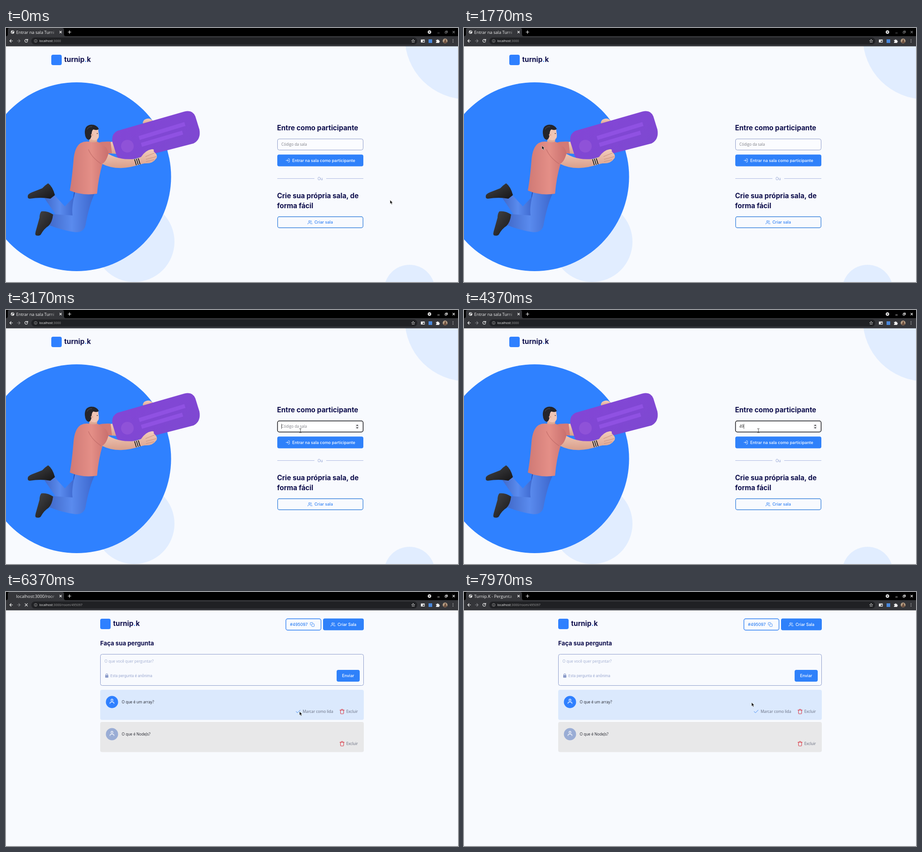
Write an HTML page that moves like this. It is 998 px wide and 561 px high and loops after 8 s.

```html
<!DOCTYPE html>
<html lang="pt-BR">
<head>
<meta charset="utf-8">
<title>Sala de perguntas</title>
<style>
  html, body { margin: 0; width: 100%; height: 100%; overflow: hidden; background: #f8fafe; }
  svg.stage { display: block; width: 100vw; height: 100vh; }
  text { white-space: pre; font: 8.32px "Open Sans", sans-serif; }
  .ui { font: 500 9px Inter, sans-serif; }
  .note { font: 400 7.9px Inter, sans-serif; }
  .title { font: 700 15.3px Inter, sans-serif; fill: #0e0e4c; }
  .sub { font-size: 13.2px; }
  .tab { font-size: 9.3px; fill: #f1f1f1; }
  .url { font-size: 7.1px; fill: #999; }
  .icon { fill: none; stroke: currentColor; stroke-width: 2; stroke-linecap: round; stroke-linejoin: round; }
  .white { color: #fff; fill: #fff; }
  .blue { color: #2f80f4; fill: #2f80f4; }
  .red { color: #d9323f; }
  .line { fill: none; stroke-width: 1.2; stroke-linecap: round; stroke-linejoin: round; }
</style>
</head>
<body>
<svg class="stage" viewBox="0 0 998 561" preserveAspectRatio="none">
  <defs>
    <symbol id="enter" viewBox="0 0 24 24"><path class="icon" d="M15 3h4a2 2 0 0 1 2 2v14a2 2 0 0 1-2 2h-4M10 17l5-5-5-5M15 12H3"/></symbol>
    <symbol id="users" viewBox="0 0 24 24"><path class="icon" d="M17 21v-2a4 4 0 0 0-4-4H5a4 4 0 0 0-4 4v2M5 7a4 4 0 1 0 8 0a4 4 0 1 0-8 0M23 21v-2a4 4 0 0 0-3-3.9M16 3.1a4 4 0 0 1 0 7.8"/></symbol>
    <symbol id="user" viewBox="0 0 24 24"><path class="icon" d="M20 21v-2a4 4 0 0 0-4-4H8a4 4 0 0 0-4 4v2M8 7a4 4 0 1 0 8 0a4 4 0 1 0-8 0"/></symbol>
    <symbol id="copy" viewBox="0 0 24 24"><path class="icon" d="M9 11q0-2 2-2h9q2 0 2 2v9q0 2-2 2h-9q-2 0-2-2zM5 15H4q-2 0-2-2V4q0-2 2-2h9q2 0 2 2v1"/></symbol>
    <symbol id="check" viewBox="0 0 24 24"><path class="icon" d="M22 5L9 18l-7-6"/></symbol>
    <symbol id="trash" viewBox="0 0 24 24"><path class="icon" d="M2 6h20M19 6v14q0 2-2 2H7q-2 0-2-2V6M8 6V4q0-2 2-2h4q2 0 2 2v2"/></symbol>
    <g id="brand">
      <rect y="59" width="23" height="23" rx="4" fill="#2f80ff"/>
      <text class="title" x="28.5" y="75">turnip<tspan fill="#2f80ff">.</tspan>k</text>
    </g>
    <g id="delete">
      <use href="#trash" class="red" x="736" y="258" width="12" height="12"/>
      <text x="751.5" y="267" fill="#62687c">Excluir</text>
    </g>
    <linearGradient id="shirt"><stop stop-color="#cf7975"/><stop offset=".55" stop-color="#e48f87"/><stop offset="1" stop-color="#c96f6d"/></linearGradient>
    <linearGradient id="skin" x2="0" y2="1"><stop stop-color="#f3cdbb"/><stop offset="1" stop-color="#d99f8b"/></linearGradient>
    <linearGradient id="jeans"><stop stop-color="#4169c9"/><stop offset=".5" stop-color="#5a8bee"/><stop offset="1" stop-color="#3c66cc"/></linearGradient>
    <linearGradient id="shoe" x2="1" y2="1"><stop stop-color="#464648"/><stop offset="1" stop-color="#151517"/></linearGradient>
    <linearGradient id="card" x2="1" y2="1"><stop stop-color="#8545d8"/><stop offset="1" stop-color="#7c49cf"/></linearGradient>
    <linearGradient id="fade"><stop stop-color="#35363a" stop-opacity="0"/><stop offset="1" stop-color="#35363a"/></linearGradient>
  </defs>

  <rect width="998" height="561" fill="#f8fafe"/>

  <g id="home">
    <g fill="#e1edff">
      <circle cx="1018" cy="20" r="137.5"/>
      <circle cx="283" cy="472" r="89"/>
      <circle cx="891" cy="579" r="56"/>
    </g>
    <circle cx="156" cy="328.5" r="208.5" fill="#2f81ff"/>
    <use href="#brand" x="100"/>

    <g id="hero">
      <path fill="url(#skin)" d="M302 209Q303 203 309 201Q318 198 324 205L320 212L304 214Z"/>
      <path fill="url(#skin)" d="M225 253L240 250L244 278L230 277Z"/>
      <path fill="#d37a76" d="M200 254Q215 250 231 251L234 277L215 277Z"/>
      <path fill="url(#card)" d="M246 227L394 184.500Q412 180 418 195L427 224Q431 246 414 255L271 292Q250 297 244 281L235 252Q232 234 246 227Z"/>
      <circle cx="268" cy="261" r="14" fill="#8f52d8"/>
      <path stroke="#8f51e2" stroke-width="9" d="M294 243L395 212M299 258L390 231"/>
      <path fill="#2f55b8" d="M150 362L180 366L158 421Q143 430 130 415Q146 402 150 362Z"/>
      <path fill="url(#jeans)" d="M85 376L105 367L130 394L150 373L153 394L150 416Q133 430 115 420Z"/>
      <path fill="url(#jeans)" d="M153 361L196 365Q184 389 175 438Q170 452 153 451Q124 447 94 435L102 411L147 414Q144 397 153 361Z"/>
      <path fill="url(#shoe)" d="M48 373Q47 367 57 363L80 354Q85 348 93 343Q103 350 108 369L98 377Q77 373 53 377Q48 377 48 373Z"/>
      <path fill="url(#shoe)" d="M78 405Q91 403 104 412Q102 429 94 437Q84 443 77 456Q74 460 66 458Q63 456 67 444L74 419Q74 410 78 405Z"/>
      <path fill="url(#skin)" d="M187 235L203 240L200 254L183 253Z"/>
      <path fill="url(#shirt)" d="M182 251Q193 254 202 251L221 264Q229 275 226 290L213 300Q204 330 201 366Q169 371 141 359Q146 331 149 293Q151 263 165 254Q173 250 182 251Z"/>
      <path fill="none" stroke="#b96563" stroke-width="1.500" opacity=".6" d="M182 268Q189 286 210 300"/>
      <path fill="url(#skin)" d="M226 278Q253 293 285 289L298 285Q308 270 321 268Q328 267 326 272L332 279Q335 285 331 289Q324 300 306 299L297 301Q247 318 212 300Q221 296 226 278Z"/>
      <path fill="none" stroke="#c98f7c" d="M308 284L328 276M309 290L332 284M309 295L327 291"/>
      <path fill="none" stroke="#222" stroke-width="2" d="M284 290L288 303M288 289L292 302M292 288L296 301"/>
      <path fill="none" stroke="#eee" d="M286 290L290 303M290 289L294 302"/>
      <path fill="#f0c5b4" d="M188 222L203 220L205 236Q206 246 196 248Q187 248 184 241Z"/>
      <path fill="#25252b" d="M174 232Q173 215 188 213.500Q200 213 205 223Q201 227 193 224Q189 226 189 236Q188 246 182 247Q175 245 174 232Z"/>
      <path fill="none" stroke="#55555d" d="M179 224Q183 217 190 218"/>
      <circle cx="201.500" cy="233" r="1" fill="#34272a"/>
      <circle cx="190" cy="236" r="2.500" fill="#e3ad9a"/>
    </g>

    <text class="title" x="598.5" y="225.5">Entre como participante</text>
    <rect id="field" x="599.5" y="245" width="189" height="24.500" rx="4"/>
    <text id="code" x="608" y="260"></text>
    <path id="caret" d="M0 251.500V262.500" stroke="#222" stroke-width=".8"/>
    <g id="spinner">
      <rect x="771.500" y="252" width="8" height="11" fill="#ededf0"/>
      <path fill="#444" d="M773 256l2.500-3l2.500 3zM773 259l2.500 3l2.500-3z"/>
    </g>
    <rect x="599" y="279.500" width="190" height="26" rx="4" fill="#2f81fa"/>
    <use href="#enter" class="white" x="617" y="287.500" width="10" height="10"/>
    <text class="ui white" x="632" y="295.500">Entrar na sala como participante</text>
    <path stroke="#a4b1de" stroke-width=".9" d="M599 332.500H681M707 332.500H789"/>
    <text class="ui" x="688" y="335.500" style="font-size:8.5px;font-weight:400" fill="#8d9ed0">Ou</text>
    <text class="title" x="598.5" y="375.500">Crie sua própria sala, de</text>
    <text class="title" x="598.5" y="397.500">forma fácil</text>
    <rect x="599.700" y="416.700" width="188.600" height="24.600" rx="4" fill="#f8fafe" stroke="#3f87de" stroke-width="1.400"/>
    <use href="#users" class="blue" x="666" y="424" width="10.500" height="10.500"/>
    <text class="ui blue" x="681" y="432">Criar sala</text>
  </g>

  <g id="room">
    <use href="#brand" x="208"/>
    <rect x="618" y="59.200" width="77.500" height="25" rx="4" fill="#f8fafe" stroke="#2f80f4" stroke-width="1.400"/>
    <text class="ui blue" x="627" y="74.500">#495097</text>
    <use href="#copy" class="blue" x="671" y="66.500" width="10.500" height="10.500"/>
    <rect x="700" y="58.500" width="90" height="26" rx="4" fill="#2f81fa"/>
    <use href="#users" class="white" x="717" y="66.500" width="10.500" height="10.500"/>
    <text class="ui white" x="732" y="74.500">Criar Sala</text>
    <text class="title sub" x="208" y="118">Faça sua pergunta</text>
    <rect x="208.500" y="137.500" width="581" height="69" rx="4" fill="#f8fafe" stroke="#8d9dcc"/>
    <text x="217.500" y="155.500" fill="#a0add0">O que você quer perguntar?</text>
    <rect x="219" y="183.500" width="7" height="5.800" rx="1" fill="#8b9bc9"/>
    <path class="line" stroke="#8b9bc9" d="M220.500 184v-1.500a2 2 0 0 1 4 0v1.500"/>
    <text class="note" x="230.500" y="187.500" fill="#97a5cf">Esta pergunta é anônima</text>
    <rect x="730" y="172" width="51" height="26" rx="4" fill="#2f81fa"/>
    <text class="ui white" x="742" y="188">Enviar</text>
    <rect x="208" y="216" width="582" height="66.500" rx="4" fill="#dbe9fd"/>
    <circle cx="234" cy="243" r="13.500" fill="#2f80ff"/>
    <use href="#user" class="white" x="227.500" y="235" width="13" height="13"/>
    <text x="255.500" y="246" fill="#20222b">O que é um array?</text>
    <use href="#check" class="blue" x="639.500" y="258.500" width="11" height="11"/>
    <text x="655" y="267" fill="#62687c">Marcar como lida</text>
    <use href="#delete"/>
    <rect x="208" y="287" width="582" height="66.500" rx="4" fill="#e8e8e9"/>
    <circle cx="234" cy="314" r="13.500" fill="#9aadd5"/>
    <use href="#user" class="white" x="227.500" y="306" width="13" height="13"/>
    <text x="255.500" y="317" fill="#20222b">O que é NodeJs?</text>
    <use href="#delete" y="71"/>
  </g>

  <g id="browser">
    <rect width="998" height="18.500" fill="#000"/>
    <path fill="#35363a" d="M0 18Q4 18 4 14V4Q4 0 8 0H124Q128 0 128 4V14Q128 18 132 18H998V40.500H0Z"/>
    <g id="globe"><circle cx="14.500" cy="9" r="3.800" fill="#eee"/><path fill="#35363a" d="M11.500 8l2 1l1 2l-1 1zM14 6l3 1l-1 2l-2-1z"/></g>
    <text id="tabTitle" class="tab" x="22.500" y="12.500"></text>
    <rect x="96" y="1" width="17" height="17" fill="url(#fade)"/>
    <rect x="113" y="1" width="12" height="17" fill="#35363a"/>
    <path class="line" stroke="#eee" d="M118.500 7l4 4m0-4l-4 4M137 9h6.500m-3.250-3.250v6.500"/>
    <rect x="56" y="21" width="852" height="15.500" rx="7.750" fill="#202124"/>
    <path class="line" stroke="#eee" d="M14.500 28.500h-6m2.800-3l-3 3l3 3"/>
    <path class="line" stroke="#818286" d="M25 28.500h6m-2.800-3l3 3l-3 3"/>
    <path id="reload" class="line" stroke="#eee" d="M47.300 26.500a3.200 3.200 0 1 0 .4 2.800M48 24.500v2.700h-2.700"/>
    <path id="stop" class="line" stroke="#eee" d="M42 25.700l5.500 5.500m0-5.500l-5.500 5.500"/>
    <circle cx="65.500" cy="28.500" r="3.200" fill="none" stroke="#aaa" stroke-width=".8"/>
    <path stroke="#aaa" stroke-width=".9" d="M65.500 28v2.300M65.500 26.500v.8"/>
    <text class="url" x="73.500" y="31"><tspan fill="#eee">localhost</tspan><tspan id="path"></tspan></text>
    <path class="line" stroke="#ddd" style="stroke-width:.8" d="M899 25.200l1 2.300l2.500.3l-1.900 1.700l.6 2.500l-2.200-1.300l-2.200 1.300l.6-2.500l-1.900-1.700l2.500-.3z"/>
    <path fill="#eee" fill-rule="evenodd" d="M916 25.500h8.500v6.500h-8.500zM920 28v2.500h3.500v-2.500z"/>
    <rect x="933" y="25" width="8" height="8" fill="#4a88dc"/>
    <path fill="#eee" d="M949.500 26.500h2.200a1.300 1.300 0 0 1 2.600 0h2.200v2.200a1.300 1.300 0 0 1 0 2.600v1.700h-7v-2a1.300 1.300 0 0 0 0-2.600z"/>
    <circle cx="969.500" cy="28.500" r="5.300" fill="#b8a086"/>
    <path fill="#6e5140" d="M966 32.500q0-3 2.500-3.500q-1-4 1.500-4q2.500 0 1.500 4q2 .5 2 3.500q-4 2-7.500 0z"/>
    <path stroke="#eee" stroke-width="1.500" stroke-linecap="round" d="M987 25.500v.01M987 28.500v.01M987 31.500v.01"/>
    <circle cx="935" cy="9" r="3.800" fill="#eee"/><path fill="#111" d="M933 8h4l-2 2.800z"/>
    <path id="controls" class="line" d="M953 11h4M969.500 8h3.500v3.500h-3.500zM971 8v-1.500h3.500v3.500h-1.500M986.500 7l4 4m0-4l-4 4"/>
  </g>

  <path id="arrow" fill="#141414" stroke="#eee" stroke-width=".6" d="M0 0V8.200L1.900 6.600L3.300 9.600L4.800 8.900L3.500 6H6Z"/>
  <path id="beam" class="line" stroke="#333" style="stroke-width:.9" d="M0 -2h1.300l.7.700l.7-.7h1.300M2 -1.300v7.600M0 7h1.300l.7-.7l.7.700h1.300"/>
</svg>
<script>
const LOOP = 8000, FOCUS = 2170, LOAD = 5950, ROOM = 6100, LOADED = 6900;
const DIGITS = '495097', KEY_TIMES = [4080, 4300, 4620, 4860, 5120, 5400];
// Pointer stops: time, x, y
const STOPS = [[0, 848, 380], [900, 688, 206], [1770, 172, 260], [2140, 648, 264],
               [7530, 648, 264], [7970, 635, 244], [LOOP, 635, 244]];
const el = id => document.getElementById(id);
const show = (id, on) => { el(id).style.display = on ? '' : 'none'; };
const set = (id, attrs) => { for (const k in attrs) el(id).setAttribute(k, attrs[k]); };

function pointerAt(t) {
  const i = STOPS.findIndex(s => s[0] > t);
  const [t0, x0, y0] = STOPS[i - 1], [t1, x1, y1] = STOPS[i];
  const u = (t - t0) / (t1 - t0), k = u * u * (3 - 2 * u);
  return [x0 + (x1 - x0) * k, y0 + (y1 - y0) * k];
}

function render(t) {
  const focused = t >= FOCUS, inRoom = t >= ROOM, loading = t >= LOAD && t < LOADED;
  const [x, y] = pointerAt(t);
  const overField = !inRoom && x > 599 && x < 789 && y > 244 && y < 270;

  show('home', !inRoom);
  show('room', inRoom);
  show('reload', !loading);
  show('stop', loading);
  show('globe', !(inRoom && loading));
  el('tabTitle').textContent = !inRoom ? 'Entrar na sala Turni' : loading ? 'localhost:3000/roor' : 'Turnip.K - Pergunta';
  el('path').textContent = ':3000' + (inRoom ? '/room/' + DIGITS : '');
  set('controls', { stroke: focused ? '#eee' : '#77787a' });

  const keys = KEY_TIMES.filter(k => k <= t);
  el('code').textContent = DIGITS.slice(0, keys.length) || 'Código da sala';
  set('code', { fill: keys.length ? '#222' : '#7c7d83' });
  set('field', focused
    ? { fill: '#fff', stroke: '#15151a', 'stroke-width': 1.5 }
    : { fill: '#fbfcff', stroke: '#8d9bc8', 'stroke-width': 1 });
  show('spinner', overField || focused);
  const blinkStart = keys.length ? keys[keys.length - 1] : FOCUS;
  show('caret', focused && (t - blinkStart) % 1000 < 500);
  const caretX = 608.5 + (keys.length && !inRoom ? el('code').getComputedTextLength() : 0);
  set('caret', { transform: `translate(${caretX} 0)` });

  show('arrow', !overField);
  show('beam', overField);
  for (const id of ['arrow', 'beam']) set(id, { transform: `translate(${x} ${y})` });
}

const start = performance.now();
function tick() {
  render((performance.now() - start) % LOOP);
  requestAnimationFrame(tick);
}
tick();
</script>
</body>
</html>
```
